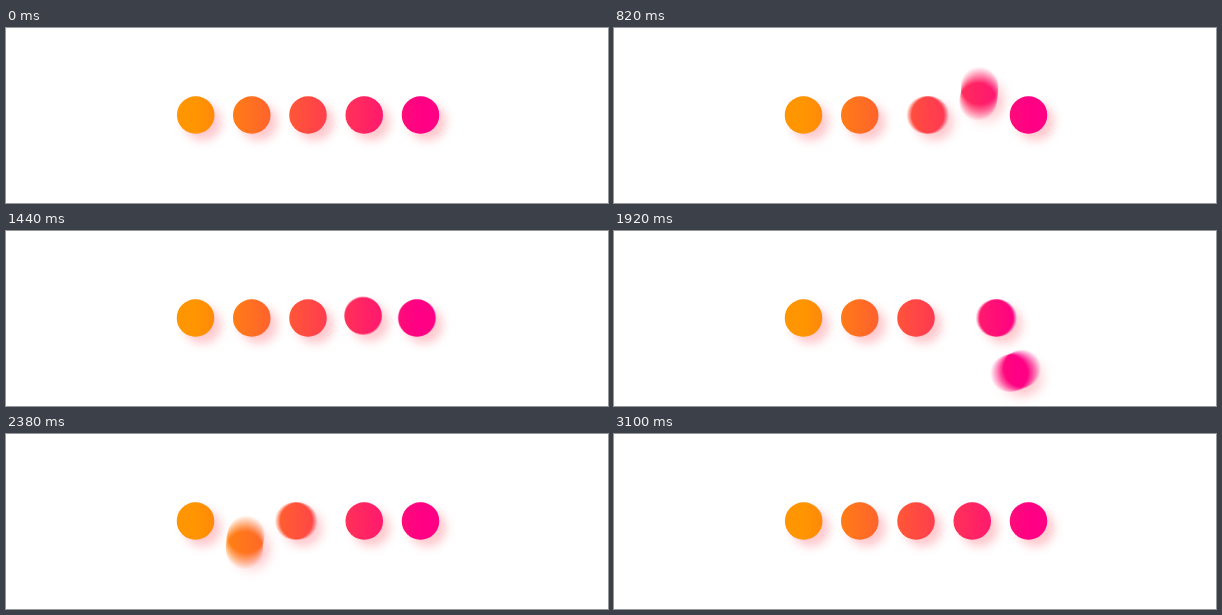
An HTML page with a canvas that plays this animation: 602 px wide and 175 px high, repeating every 3120 ms.

```html
<!DOCTYPE html>
<html lang="en">
<head>
<meta charset="utf-8">
<title>Loader</title>
<style>
  html, body { margin: 0; width: 100%; height: 100%; overflow: hidden; background: #fff; }
  canvas { display: block; filter: drop-shadow(7px 7px 5px rgba(255, 30, 50, .24)); }
</style>
</head>
<body>
<canvas id="stage" width="602" height="175"></canvas>
<script>
const ctx = document.getElementById('stage').getContext('2d');
const HALF = 1560, LOOP = 2 * HALF;
const GAP = 56.25, RADIUS = 18.75, CX = 302, CY = 87;
const SHUTTER = 24, SAMPLES = 17;
const BULGE = 68, LIFT = 75;

const sine = u => (1 - Math.cos(Math.PI * u)) / 2;

// One dot glides along the row; each neighbour it meets hops over it on a cubic curve.
// The way back is the same motion turned by 180 degrees.
function pose(time) {
  const t = (time + LOOP) % LOOP;
  const turn = t < HALF ? 1 : -1;
  const travel = 4 * sine((t % HALF + 35) / 1605);
  const k = Math.min(3, Math.floor(travel));
  const u = sine(travel - k), v = 1 - u;
  const hopX = GAP / 2 * (v ** 3 - u ** 3) + 3 * BULGE * u * v * (v - u);
  const dots = [
    [(travel - 2) * GAP, 0],
    [(k - 1.5) * GAP + hopX, -3 * LIFT * u * v]
  ];
  for (let i = 0; i < 5; i++) {
    if (i !== k && i !== k + 1) dots.push([(i - 2) * GAP, 0]);
  }
  return dots.map(([x, y]) => [CX + turn * x, CY + turn * y]);
}

function draw(time) {
  ctx.globalCompositeOperation = 'source-over';
  ctx.globalAlpha = 1;
  ctx.clearRect(0, 0, 602, 175);

  // Motion blur: the mean of several poses within the shutter time
  ctx.globalCompositeOperation = 'lighter';
  ctx.globalAlpha = 1 / SAMPLES;
  ctx.fillStyle = '#000';
  for (let i = 0; i < SAMPLES; i++) {
    for (const [x, y] of pose(time + (i / (SAMPLES - 1) - .5) * SHUTTER)) {
      ctx.beginPath();
      ctx.arc(x, y, RADIUS, 0, 2 * Math.PI);
      ctx.fill();
    }
  }

  // The gradient spans the outermost dots
  const xs = pose(time).map(dot => dot[0]);
  const paint = ctx.createLinearGradient(Math.min(...xs), 0, Math.max(...xs), 0);
  paint.addColorStop(0, 'rgb(255, 149, 0)');
  paint.addColorStop(1, 'rgb(255, 0, 132)');
  ctx.globalCompositeOperation = 'source-in';
  ctx.globalAlpha = 1;
  ctx.fillStyle = paint;
  ctx.fillRect(0, 0, 602, 175);
}

const start = performance.now();
function tick() {
  draw((performance.now() - start) % LOOP);
  requestAnimationFrame(tick);
}
tick();
</script>
</body>
</html>
```
